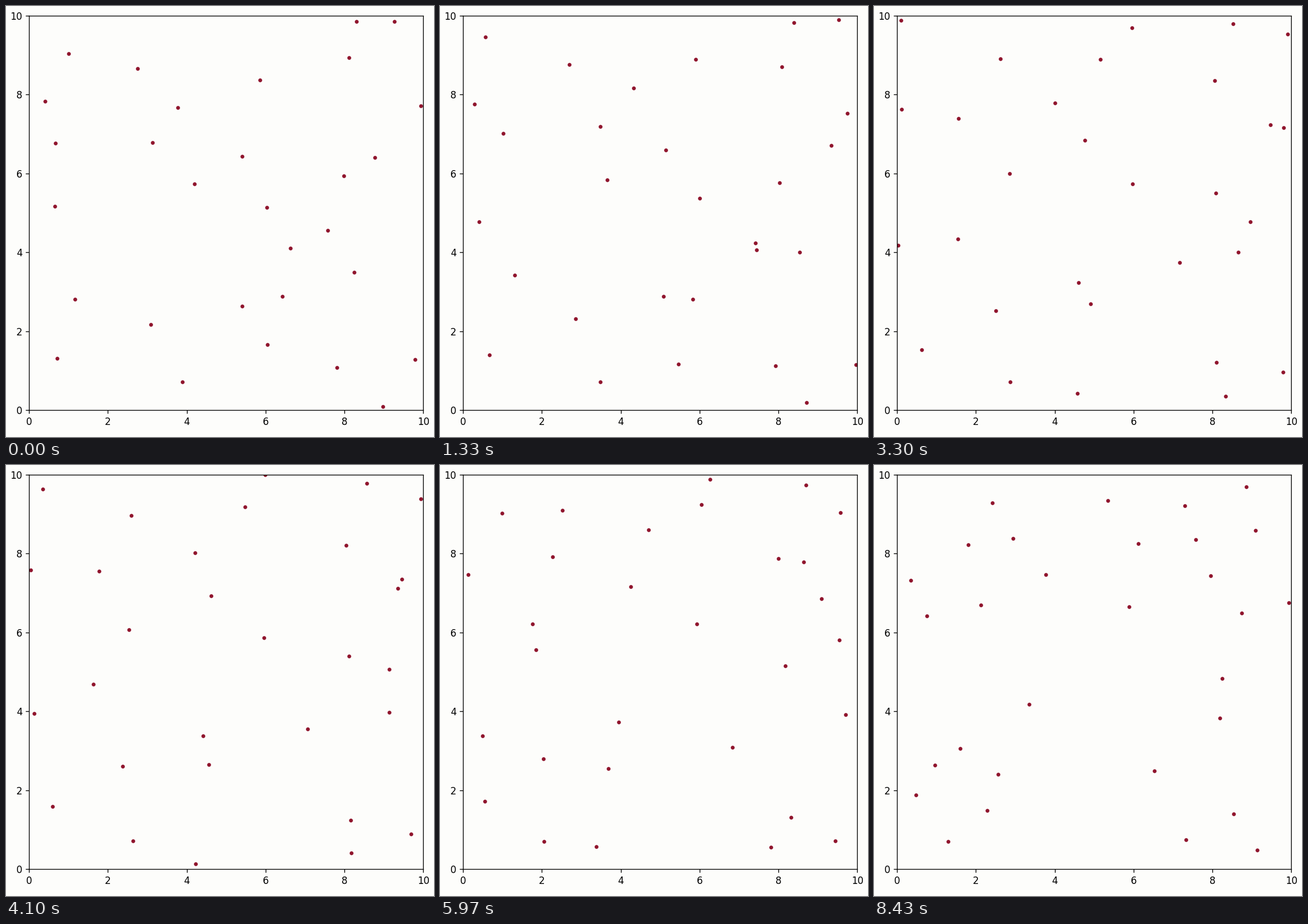
A matplotlib script that plays this animation: 745 by 751 pixels, repeating every 8460 ms.

```python
import matplotlib.pyplot as plt
import numpy as np
from matplotlib.animation import FuncAnimation

W, H, DPI = 745, 751, 120
LOOP, STEP = 8460, 30
FRAMES = LOOP // STEP
ORIGIN = np.array([40, 704])         # pixel position of the axes' origin
UNIT = np.array([68.64, -68.69])     # pixels per axis unit
INK, PAPER = "#90152d", "#fdfdfb"

# Each dot: start x, y and its drift over one loop, in pixels
DOTS = np.array([
    (109, 83, -193, -188), (229, 109, -23, -43), (68, 166, -52, 35),
    (86, 239, 156, -111), (299, 177, 242, -214), (255, 238, 152, -176),
    (442, 129, 18, -232), (610, 27, 38, 11), (676, 27, 113, -107),
    (597, 90, -11, 103), (722, 174, -82, 84), (642, 264, 251, -134),
    (588, 296, 18, 76), (411, 262, -112, -71), (328, 310, -236, -47),
    (85, 349, -111, 174), (454, 351, -10, -104), (560, 391, -72, 142),
    (495, 422, 356, 19), (606, 464, 125, -224), (481, 506, -265, 33),
    (411, 523, -141, -106), (120, 511, 66, -267), (252, 555, -102, -61),
    (455, 590, -258, 216), (89, 614, -16, -39), (307, 655, -178, 1),
    (576, 630, 50, -22), (712, 616, 74, 55), (656, 698, -113, -45),
])
START = (DOTS[:, :2] - ORIGIN) / UNIT
DRIFT = DOTS[:, 2:] / UNIT


def bounce(v):
    """Fold free motion back between the walls at 0 and 10."""
    return 10 - np.abs(10 - np.abs(v))


fig = plt.figure(figsize=((W + 0.01) / DPI, (H + 0.01) / DPI), dpi=DPI,
                 facecolor=PAPER)
left, bottom = ORIGIN[0] / W, 1 - ORIGIN[1] / H
ax = fig.add_axes([left, bottom, 10 * UNIT[0] / W, -10 * UNIT[1] / H],
                  facecolor=PAPER)
ticks = range(0, 11, 2)
ax.set(xlim=(0, 10), ylim=(0, 10), xticks=ticks, yticks=ticks)
dots, = ax.plot([], [], "o", color=INK, markersize=3)


def draw(i):
    dots.set_data(*bounce(START + DRIFT * i / (FRAMES - 1)).T)
    return dots,


anim = FuncAnimation(fig, draw, frames=FRAMES, interval=STEP,
                     repeat=True, repeat_delay=0)
plt.show()
```
